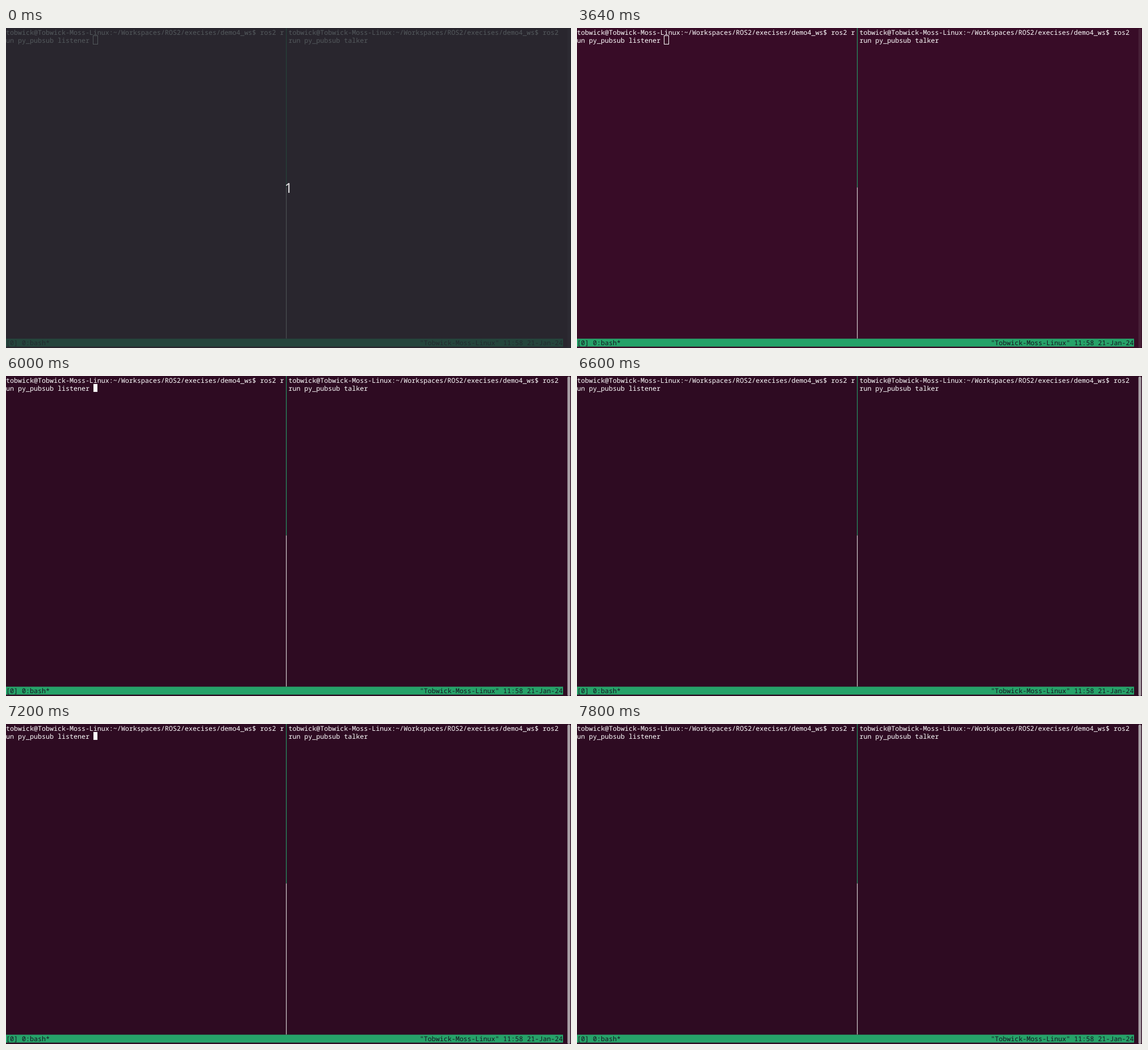
Animation of 995x563 px, one loop 8 s. Source, as an HTML page:

```html
<!DOCTYPE html>
<html lang="en">
<head>
<meta charset="utf-8">
<title>Terminal panes</title>
<style>
  html, body { margin: 0; width: 100%; height: 100%; overflow: hidden; background: #300a24; }
  svg { display: block; width: 995px; height: 563px; }
  text { font: 11.667px "Noto Sans Mono", "DejaVu Sans Mono", monospace; fill: #fff; white-space: pre; text-rendering: geometricPrecision; }
  .status text { fill: #171421; }
  .count text { font: 24px "Noto Sans", sans-serif; fill: #e6e4e6; text-anchor: middle; }
</style>
</head>
<body>
<svg viewBox="0 0 995 563">
  <rect id="back" width="995" height="563"/>
  <text y="12">tobwick@Tobwick-Moss-Linux:~/Workspaces/ROS2/execises/demo4_ws$ ros2 r</text>
  <text y="26">un py_pubsub listener</text>
  <text x="497.4" y="12">tobwick@Tobwick-Moss-Linux:~/Workspaces/ROS2/execises/demo4_ws$ ros2</text>
  <text x="497.4" y="26">run py_pubsub talker</text>
  <rect x="493.1" width="1.1" height="280.5" fill="#26a269"/>
  <rect x="493.1" y="280.5" width="1.1" height="266" fill="#e4e2e0"/>
  <g class="status">
    <rect y="546.6" width="981" height="14" fill="#26a269"/>
    <text y="558">[0] 0:bash*</text>
    <text x="728.7" y="558">"Tobwick-Moss-Linux" 11:58 21-Jan-24</text>
  </g>
  <rect id="scroll" x="988.7" y="1" width="5" height="562" rx="2.5"/>
  <rect id="hollow" x="153.5" y="13.5" width="8" height="15" fill="none" stroke="#fff"/>
  <rect id="cursor" x="154" y="14" width="7" height="14" fill="#fff"/>
  <g id="count" class="count">
    <rect width="995" height="563" fill="#252d31" opacity=".79"/>
    <text x="497.5" y="290">1</text>
  </g>
</svg>
<script>
  const LOOP = 8000, FOCUS = 6000, BLINK = 600;
  const el = id => document.getElementById(id);
  const show = (id, on) => el(id).setAttribute("visibility", on ? "visible" : "hidden");
  const start = performance.now();

  function draw() {
    const t = Math.max(0, performance.now() - start) % LOOP;
    const focused = t >= FOCUS;
    el("back").setAttribute("fill", focused ? "#2e0b22" : "#380c27");
    el("scroll").setAttribute("fill", focused ? "#a89fa5" : "#472037");
    show("count", t < 100);
    show("hollow", !focused);
    show("cursor", focused && Math.floor((t - FOCUS) / BLINK) % 2 === 0);
    requestAnimationFrame(draw);
  }
  draw();
</script>
</body>
</html>
```
